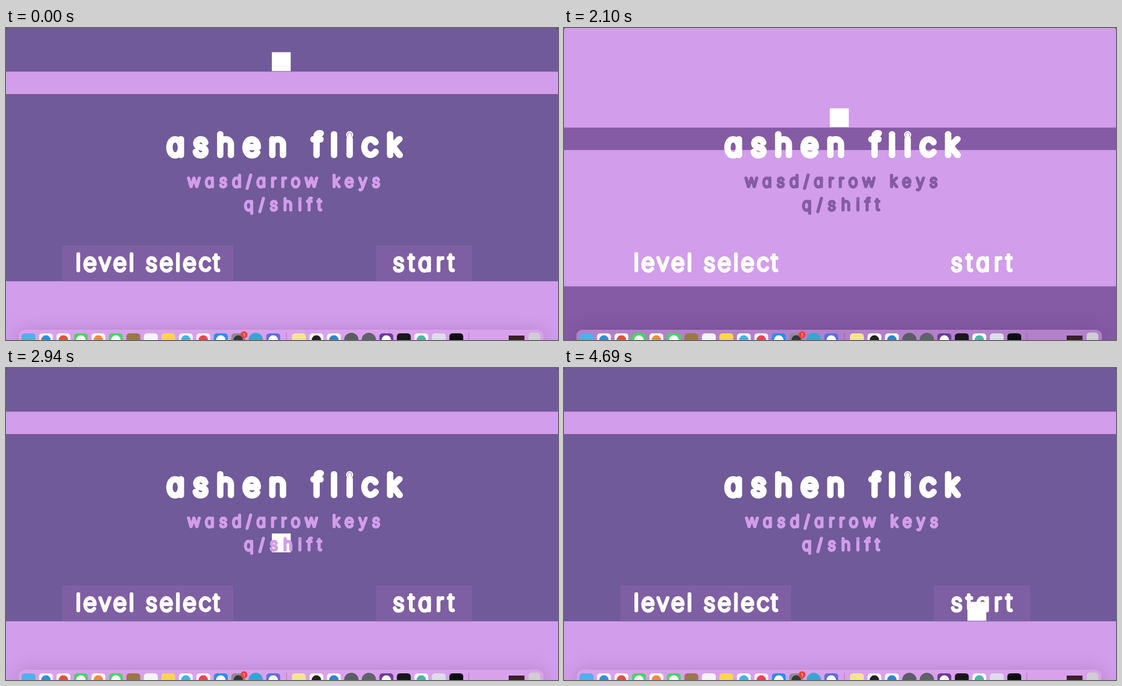
Recreate the animation shown at these times as an HTML page with a canvas. Size 996 by 562 pixels, loop 4.97 s.

```html
<!DOCTYPE html>
<html lang="en">
<head>
<meta charset="utf-8">
<title>ashen flick</title>
<style>
  html, body { margin: 0; width: 100%; height: 100%; overflow: hidden; background: #705a99; }
  canvas, svg { position: absolute; left: 0; top: 0; width: 996px; height: 562px; }
  text {
    font-family: Inter, sans-serif;
    font-weight: 100;
    font-optical-sizing: none;
    font-feature-settings: "cv11";
    text-anchor: middle;
    stroke-linejoin: round;
    stroke-linecap: round;
  }
</style>
</head>
<body>
<canvas id="stage" width="996" height="562"></canvas>
<svg id="labels" viewBox="0 0 996 562"></svg>
<script>
const LOOP = 4970, STEP = 70;
const LILAC = '#d29dea', DUSK = '#705a99', PLUM = '#855ba5', PANEL = '#7f5fa3';
const W = 996, H = 562, SIZE = 34, GRAVITY = 525;
const TO_LIGHT = 1120, TO_DARK = 2240;

const ctx = document.getElementById('stage').getContext('2d');
const svg = document.getElementById('labels');

function svgNode(tag, parent) {
  const el = document.createElementNS('http://www.w3.org/2000/svg', tag);
  parent.append(el);
  return el;
}

// Adds a label whose thin letters are thickened with a round pen to the wanted stem.
function label(str, center, baseline, size, stem, spacing) {
  ctx.font = `100 ${size}px Inter, sans-serif`;
  const m = ctx.measureText('l');
  const pen = Math.max(0, stem - m.actualBoundingBoxLeft - m.actualBoundingBoxRight);
  const group = svgNode('g', svg);
  // The finer pass fills the hole that a wide pen leaves in small dots.
  for (const width of [pen, pen * 0.4]) {
    const el = svgNode('text', group);
    el.textContent = str;
    el.setAttribute('x', center + spacing / 2);
    el.setAttribute('y', baseline);
    el.style.fontSize = size + 'px';
    el.style.letterSpacing = spacing + 'px';
    el.style.strokeWidth = width + 'px';
  }
  group.lastChild.setAttribute('aria-hidden', 'true');
  return group;
}

function tint(el, color) {
  el.style.fill = el.style.stroke = color;
}

tint(label('ashen flick', 502, 229, 52, 12.4, 17), '#fff');
tint(label('level select', 255.3, 437, 41, 7.8, 4.9), '#fff');
tint(label('start', 753, 437, 41, 7.8, 8), '#fff');
const keysHint = label('wasd/arrow keys', 501.2, 285.5, 28, 7, 9.4);
const shiftHint = label('q/shift', 499.5, 327.5, 28, 7, 10.4);

function box(x, y, w, h, color) {
  ctx.fillStyle = color;
  ctx.fillRect(x, y, w, h);
}

function rounded(x, y, w, h, r, color) {
  ctx.fillStyle = color;
  ctx.beginPath();
  ctx.roundRect(x, y, w, h, r);
  ctx.fill();
}

function disc(x, y, r, color) {
  ctx.fillStyle = color;
  ctx.beginPath();
  ctx.arc(x, y, r, 0, 7);
  ctx.fill();
}

// Camera offset that dies out over seven steps after a swap.
function shake(t, start, dx, dy) {
  const k = (t - start) / STEP;
  if (k < 0 || k > 7) return [0, 0];
  const fade = 1 - k / 7.5;
  return [dx * fade * Math.cos(k * 2.3), dy * fade * Math.cos(k * 2.7)];
}

// Top edge and squash of the player after falling from one ledge to another.
function drop(t, start, from, to) {
  const s = Math.max(0, t - start) / 1000;
  const landing = Math.sqrt(2 * (to - from) / GRAVITY);
  if (s < landing) return { y: from + GRAVITY * s * s / 2, squash: 0 };
  const u = (s - landing) * 1000;
  const squash = u > 370 ? 0 : 0.16 * Math.exp(-u / 120) * Math.cos(u / 60);
  return { y: to, squash };
}

function drawPlayer(t) {
  const { y, squash } = t < 2175 ? drop(t, 1120, 43.6, 144.4) : drop(t, 2175, 144.4, 421.3);
  const x = 479.7 + 0.25 * Math.min(Math.max(t - 3640, 0), 993);
  const w = SIZE * (1 + squash), h = SIZE * (1 - squash);
  box(x + (SIZE - w) / 2, y + SIZE - h, w, h, '#fff');
}

function drawWorld(t, light) {
  const [dx, dy] = light ? shake(t, TO_LIGHT, -0.8, -1) : shake(t, TO_DARK, -0.6, -2);
  const solid = light ? PLUM : LILAC;
  box(0, 0, W, H, light ? LILAC : DUSK);
  ctx.save();
  ctx.translate(dx, dy);
  box(-9, light ? 179.4 : 78.6, W + 18, 40.4, solid);
  box(-9, light ? 465.3 : 456.2, W + 18, 120, solid);
  if (!light) {
    box(101.5, 391.5, 308.5, 64.7, PANEL);
    box(667.5, 391.5, 173.5, 64.7, PANEL);
  }
  drawPlayer(t);
  ctx.restore();
}

// Each icon is "tile", "tile/disc" or "/disc".
const ICONS = ('#4fb0ee #f4f4f8/#2f8fe0 #f6f4f4/#e2503c #45d660/#fff #f8f6f2/#ee8a3c #48d662/#fff ' +
  '#9b7748 #f6f6f8 #fbd54e #f2f6fa/#42b4e4 #f7f3f5/#f04058 #2390f3/#fff #8a8d92/#34383c ' +
  '/#35a6d4 #5c6ee6/#fff').split(' ');
const TOOLS = ('#f3e58e #f6f6f4/#222 #f4f8fb/#2a86d0 /#5a5d63 /#5f6268 #6b3d98/#fff #17171a ' +
  '#f8f6f8/#48b8a8 #dcdde8 #0c0c12').split(' ');

function drawIcons(icons, firstX) {
  icons.forEach((icon, i) => {
    const x = firstX + i * 31.55;
    const [tile, mark] = icon.split('/');
    if (tile) rounded(x - 12.5, 550, 25, 25, 5.5, tile);
    if (mark) disc(x, 562, tile ? 8.5 : 13, mark);
  });
}

function dockShape() {
  ctx.roundRect(22.5, 544, 948, 40, 10);
}

function drawDock() {
  ctx.save();
  ctx.beginPath();
  ctx.rect(0, 500, W, 62);
  dockShape();
  ctx.clip('evenodd');
  ctx.shadowColor = 'rgba(60,20,80,.22)';
  ctx.shadowBlur = 34;
  ctx.shadowOffsetY = 3;
  rounded(22.5, 544, 948, 40, 10, '#000');
  ctx.restore();

  rounded(22.5, 544, 948, 40, 10, 'rgba(225,165,240,.5)');
  ctx.strokeStyle = 'rgba(255,230,255,.2)';
  ctx.beginPath();
  dockShape();
  ctx.stroke();

  drawIcons(ICONS, 40.5);
  drawIcons(TOOLS, 528.5);
  for (const x of [506, 835]) box(x - 0.5, 549, 1, 13, 'rgba(70,30,90,.35)');
  box(907, 554, 28.5, 8, '#3a2029');
  rounded(943, 548.5, 21, 24, 6, '#d0ccd4');

  disc(429.5, 552.5, 6.3, '#f0403c');
  ctx.fillStyle = '#fff';
  ctx.font = '8px Inter, sans-serif';
  ctx.textAlign = 'center';
  ctx.fillText('1', 429.5, 555.5);
}

function drawCorners() {
  ctx.fillStyle = '#2b2436';
  for (const [x, d] of [[0, 3], [W, -3]]) {
    ctx.beginPath();
    ctx.moveTo(x, 0);
    ctx.lineTo(x + d, 0);
    ctx.quadraticCurveTo(x, 0, x, 3);
    ctx.fill();
  }
}

function render(ms) {
  const t = Math.floor(ms % LOOP / STEP) * STEP;
  const light = t >= TO_LIGHT && t < TO_DARK;
  drawWorld(t, light);
  drawDock();
  drawCorners();
  tint(keysHint, light ? PLUM : LILAC);
  tint(shiftHint, light ? PLUM : LILAC);
  keysHint.setAttribute('transform', `translate(${light ? -1 : 0} 0)`);
}

const begin = performance.now();
function tick() {
  render(performance.now() - begin);
  requestAnimationFrame(tick);
}
tick();
</script>
</body>
</html>
```
